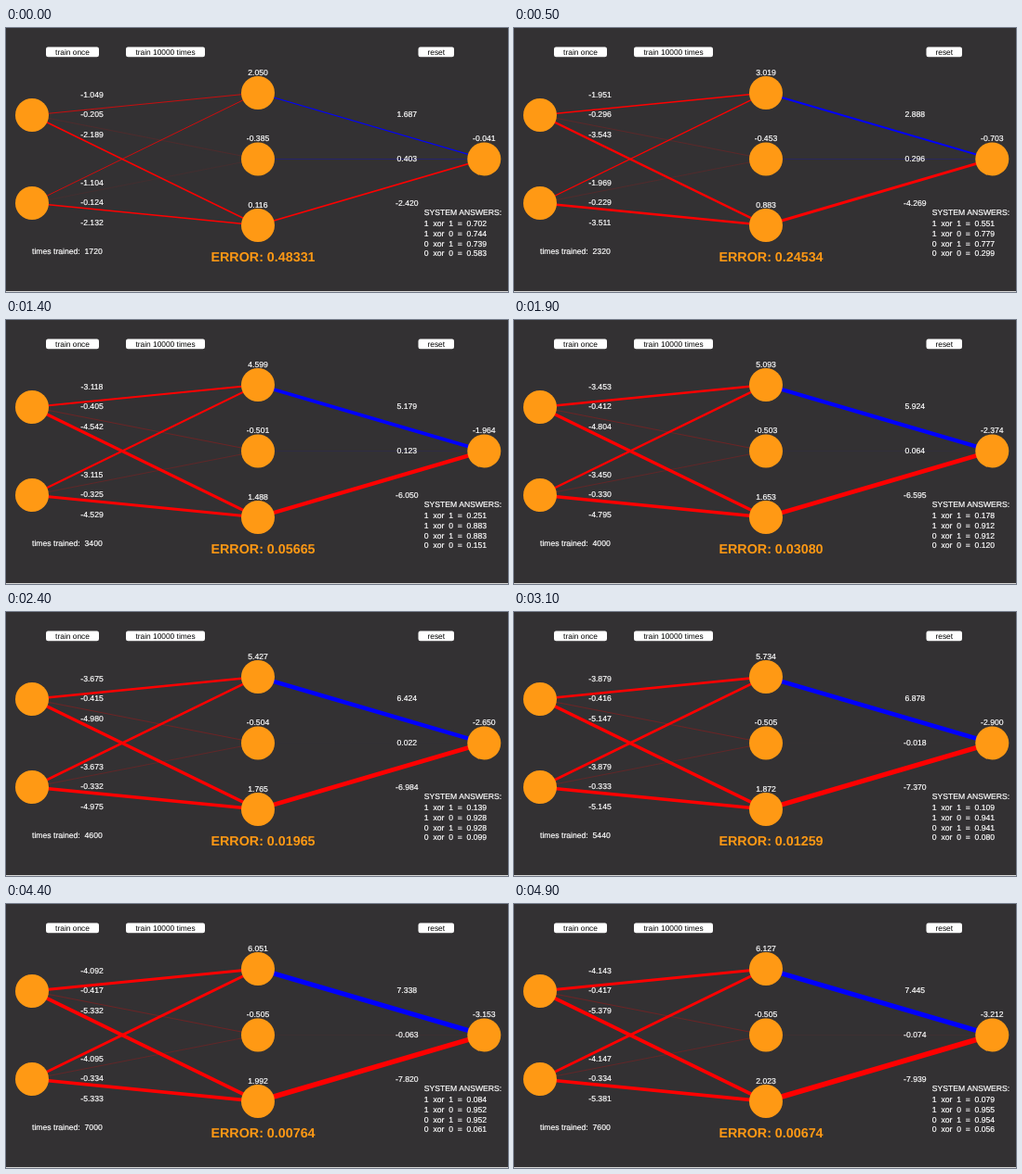
Write an HTML page that moves like this. It is 540 px wide and 285 px high and loops after 5000 ms.

```html
<!DOCTYPE html>
<html lang="en">
<head>
<meta charset="utf-8">
<title>XOR network training</title>
<style>
html, body { margin: 0; width: 100%; height: 100%; overflow: hidden; background: #333133; }
svg { display: block; width: 540px; height: 285px; }
text { font: 8.64px "Liberation Sans", Arial, sans-serif; fill: #fff; stroke: #fff; stroke-width: 0.2; white-space: pre; text-rendering: geometricPrecision; }
.mid { text-anchor: middle; }
.button { font-size: 8.4px; fill: #000; stroke: none; }
.error { font-size: 14.3px; font-weight: bold; fill: #ff9914; stroke: none; }
</style>
</head>
<body>
<svg id="stage" viewBox="0 0 540 285"></svg>
<script>
const stage = document.getElementById("stage");
const STEP = 100, STEPS = 50, LAST = STEPS - 1;

// Each weight: first value, last value, half-way step, steepness
const weights = {
  a1: [-1.049, -4.143, 10.5, 1.4],
  a2: [-0.205, -0.417, 5.5, 3],
  a3: [-2.189, -5.379, 8, 1.1],
  b1: [-1.104, -4.147, 10.8, 1.4],
  b2: [-0.124, -0.334, 5, 3],
  b3: [-2.132, -5.381, 8, 1.1],
  o1: [1.687, 7.445, 12.5, 1.6],
  o2: [0.403, -0.074, 14, 1.4],
  o3: [-2.420, -7.939, 12, 1.1],
  h1: [2.050, 6.127, 12, 1.5],
  h2: [-0.385, -0.505, 4.6, 3],
  h3: [0.116, 2.023, 8.8, 1.1],
  out: [-0.041, -3.212, 12.5, 1.6]
};
const cases = [[1, 1], [1, 0], [0, 1], [0, 0]];

// Learning curve that rises from 0 and levels off
const rise = (step, half, power) => step ** power / (step ** power + half ** power);
const learn = (step, [from, to, half, power]) =>
  from + (to - from) * rise(step, half, power) / rise(LAST, half, power);

const sigmoid = x => 1 / (1 + Math.exp(-x));
const answer = (w, [a, b]) => sigmoid([1, 2, 3].reduce((sum, n) =>
  sum + w["o" + n] * sigmoid(w["h" + n] + a * w["a" + n] + b * w["b" + n]), w.out));

function add(tag, attrs, text = "") {
  const el = document.createElementNS("http://www.w3.org/2000/svg", tag);
  for (const k in attrs) el.setAttribute(k, attrs[k]);
  el.textContent = text;
  return stage.appendChild(el);
}
const label = (x, y, cls = "", text = "") => add("text", { x, y, class: cls }, text);

const nodes = {
  a: [28, 94], b: [28, 189],
  h1: [271, 70], h2: [271, 141.5], h3: [271, 213],
  out: [514.3, 141.5]
};

function labelPlace(key) {
  if (nodes[key]) return [nodes[key][0], nodes[key][1] - 19.4];
  const row = key[1] - 1;
  if (key[0] === "o") return [431.3, 96.1 + 47.7 * row];
  return [92.5, nodes[key[0]][1] - 18.9 + 21.3 * row];
}

add("rect", { width: 540, height: 285, fill: "#333133" });
add("rect", { y: 284, width: 540, height: 1, fill: "#d8d8d8" });

const links = {};
for (const k in weights) {
  if (nodes[k]) continue;
  const [from, to] = k[0] === "o" ? ["h" + k[1], "out"] : [k[0], "h" + k[1]];
  const [x1, y1] = nodes[from], [x2, y2] = nodes[to];
  links[k] = add("line", { x1, y1, x2, y2 });
}
for (const [cx, cy] of Object.values(nodes)) add("circle", { cx, cy, r: 18, fill: "#ff9914" });

for (const [x, width, text] of [[43, 57, "train once"], [129, 85, "train 10000 times"], [443.5, 38.5, "reset"]]) {
  add("rect", { x, y: 20.5, width, height: 10.7, rx: 2.2, fill: "#fff" });
  label(x + width / 2, 28.7, "button mid", text);
}

const labels = {};
for (const k in weights) labels[k] = label(...labelPlace(k), "mid");
const count = label(28, 243.5);
const errorText = label(220.5, 252.2, "error");
label(449.8, 202, "", "SYSTEM ANSWERS:");
const rows = cases.map((c, i) => label(449.8, 214.1 + 10.7 * i));

function draw(step) {
  const w = {};
  for (const k in weights) {
    w[k] = learn(step, weights[k]);
    labels[k].textContent = w[k].toFixed(3);
  }
  for (const k in links) {
    links[k].setAttribute("stroke", w[k] > 0 ? "#00f" : "#f00");
    links[k].setAttribute("stroke-width", Math.abs(w[k]) * 0.7);
  }
  let error = 0;
  cases.forEach(([a, b], i) => {
    const y = answer(w, [a, b]);
    error += (y - (a ^ b)) ** 2 / 2;
    rows[i].textContent = `${a}  xor  ${b}  =  ${y.toFixed(3)}`;
  });
  count.textContent = `times trained:  ${1720 + 120 * step}`;
  errorText.textContent = `ERROR: ${error.toFixed(5)}`;
}

const start = performance.now();
function tick() {
  draw(Math.floor((performance.now() - start) / STEP) % STEPS);
  requestAnimationFrame(tick);
}
tick();
</script>
</body>
</html>
```
